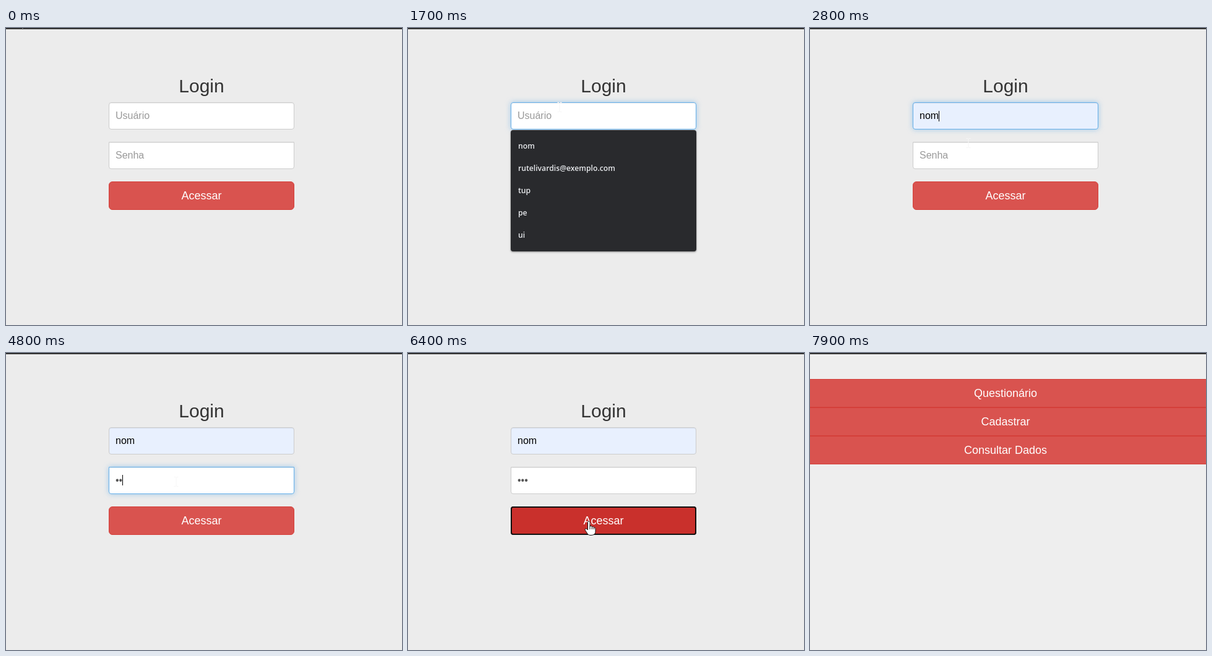
An HTML page that plays this animation: 640x480 px, repeating every 8.9 s.

```html
<!DOCTYPE html>
<html lang="pt-BR">
<head>
<meta charset="utf-8">
<title>Login</title>
<style>
html, body { margin: 0; width: 100%; height: 100%; overflow: hidden; }
body { position: relative; background: #ececec; font-family: "Liberation Sans", Arial, sans-serif; }
body.menu { background: #eee; }
body:not(.menu) #menu, body.menu #login { display: none; }
div, h2, svg { position: absolute; box-sizing: border-box; margin: 0; white-space: pre; }
#bar { left: 0; top: 0; width: 100%; height: 2px; background: #303030; }
#login, #menu { left: 0; top: 0; }
h2 { left: 166px; top: 77px; width: 300px; font: 30px/33px "Liberation Sans", Arial, sans-serif; color: #333; text-align: center; }
.field {
  --focus: 0; left: 166px; width: 300px; height: 44px; padding-left: 10px; background: #fff;
  border: 1px solid color-mix(in srgb, #66afe9 calc(var(--focus) * 100%), #ccc); border-radius: 4px;
  box-shadow: inset 0 1px 1px rgb(0 0 0 / .075), 0 0 8px rgb(102 175 233 / calc(.6 * var(--focus)));
  font-size: 16px; line-height: 42px; color: #999;
}
#user { top: 120px; }
#user.filled { background: #e8f0fe; color: #000; }
#pass { top: 184px; border-radius: 0 0 4px 4px; }
#pass.filled { color: #555; }
.caret { width: 1px; height: 17px; background: #000; }
.button {
  height: 46px; background: #d9534f; border: 1px solid #d43f3a;
  font-size: 18px; line-height: 44px; color: #fff; text-align: center;
}
#enter { left: 166px; top: 248px; width: 300px; border-radius: 6px; }
#enter.hover { background: #c9302c; border-color: #ac2925; }
#enter.pressed { border-radius: 4px; outline: 2px solid #101010; outline-offset: -2px; }
#menu .button { left: -8px; width: 648px; border-width: 1px 0; }
#list {
  left: 166px; top: 165px; width: 300px; height: 196px; padding: 8px 0; border-radius: 4px;
  background: #292a2d; box-shadow: 0 1px 3px rgb(0 0 0 / .45);
}
#list div {
  position: static; height: 36px; padding-left: 12px; color: #e8eaed;
  font: 600 12.2px/36px "Open Sans", "Noto Sans", sans-serif;
}
#list .hover { background: #3f4043; }
svg { left: 0; top: 0; overflow: visible; }
</style>
</head>
<body>
<div id="bar"></div>
<div id="login">
  <h2>Login</h2>
  <div class="field" id="user"></div>
  <div class="field" id="pass"></div>
  <div class="button" id="enter">Acessar</div>
  <div id="list"></div>
  <div class="caret" id="caret"></div>
</div>
<div id="menu">
  <div class="button" style="top:42px">Questionário</div>
  <div class="button" style="top:88px">Cadastrar</div>
  <div class="button" style="top:134px">Consultar Dados</div>
</div>
<svg width="640" height="480"><path id="cursor"/></svg>
<script>
const LOOP = 8900, STEP = 100;
const names = ["nom", "rutelivardis@exemplo.com", "tup", "pe", "ui"];
const [user, pass, enter, list, caret, cursor] =
  ["user", "pass", "enter", "list", "caret", "cursor"].map(id => document.getElementById(id));
const rows = names.map(name => {
  const row = list.appendChild(document.createElement("div"));
  row.textContent = name;
  return row;
});

// path, fill, stroke
const shapes = {
  arrow: ["M0 0V16.5L3.8 13 6.4 18.5 8.8 17.4 6.4 12H11.5Z", "#fff", "#111"],
  beam: ["M-3.5-7.5H-1L0-6.5 1-7.5H3.5M0-6.5V6.5M-3.5 7.5H-1L0 6.5 1 7.5H3.5", "none", "#f6f6f6"],
  hand: ["M-1.5 1.5C-1.5-.5 2-.5 2 1.5V8C4 7 5 8 5.4 9 7 8.2 8.2 9 8.4 10 10 9.5 11 10.5 11 12V16" +
         "C11 20 9 22.5 3 22.5-1 22.5-2 20-5.5 14.5-7 12-4 10.5-1.5 14ZM2 8V13M5.4 9V13M8.4 10V13", "#fff", "#111"]
};
// time, x, y, shape from then on
const path = [
  [0, 20, -17, "arrow"], [500, 20, -17, "arrow"], [1000, 245, 128, "beam"],
  [2200, 245, 128, "beam"], [2300, 258, 279, "arrow"], [2400, 256, 186, "arrow"],
  [2700, 256, 186, "arrow"], [2800, 256, 186, "beam"], [3000, 275, 208, "beam"],
  [5700, 275, 208, "beam"], [5800, 280, 236, "arrow"], [5900, 287, 261, "hand"],
  [6100, 292, 272, "hand"], [6500, 292, 272, "hand"], [6600, 292, 272, "arrow"],
  [6900, 3, -15, "arrow"], [7000, 3, -15, "arrow"], [7600, 13.5, -17, "arrow"],
  [7800, 13.5, -17, "arrow"], [7900, 13.5, -40, "arrow"], [LOOP, 13.5, -40, "arrow"]
];

const between = (t, from, to) => t >= from && t < to;
const ease = (t, start) => {
  const p = Math.min(1, Math.max(0, (t - start) / 150));
  return p * p * (3 - 2 * p);
};

function setField(field, value, placeholder, focus) {
  field.textContent = value || placeholder;
  field.classList.toggle("filled", value !== "");
  field.style.setProperty("--focus", focus);
}

function drawCursor(t) {
  const i = path.findLastIndex(key => key[0] <= t);
  const [t0, x0, y0, shape] = path[i];
  const [t1, x1, y1] = path[i + 1];
  const p = (t - t0) / (t1 - t0);
  const [d, fill, stroke] = shapes[shape];
  cursor.setAttribute("d", d);
  cursor.setAttribute("fill", fill);
  cursor.setAttribute("stroke", stroke);
  cursor.setAttribute("transform", `translate(${x0 + (x1 - x0) * p} ${y0 + (y1 - y0) * p})`);
}

function draw(now) {
  const t = Math.floor(now % LOOP / STEP) * STEP;
  document.body.classList.toggle("menu", t >= 6600);

  const hovered = t >= 2400 ? 0 : t >= 2300 ? 2 : -1;
  const bullets = [4400, 4800, 5000].filter(time => t >= time).length;
  setField(user, names[hovered] || "", "Usuário", ease(t, 1250) - ease(t, 3260));
  setField(pass, "•".repeat(bullets), "Senha", ease(t, 3260) - ease(t, 6250));

  list.hidden = !between(t, 1300, 2800);
  list.style.display = list.hidden ? "none" : "";
  rows.forEach((row, i) => row.classList.toggle("hover", i === hovered));

  enter.classList.toggle("hover", t >= 5900);
  enter.classList.toggle("pressed", t >= 6300);

  const inPass = t >= 3300;
  const caretOn = [[1300, 1700], [2800, 3800], [4300, 5500], [6000, 6300]].some(span => between(t, ...span));
  caret.style.display = caretOn ? "" : "none";
  caret.style.left = (inPass ? Math.round(177 + 5.6 * bullets) : t < 2800 ? 177 : 208) + "px";
  caret.style.top = (inPass ? 198 - (bullets > 0) : 134) + "px";

  drawCursor(t);
  requestAnimationFrame(draw);
}
requestAnimationFrame(draw);
</script>
</body>
</html>
```
